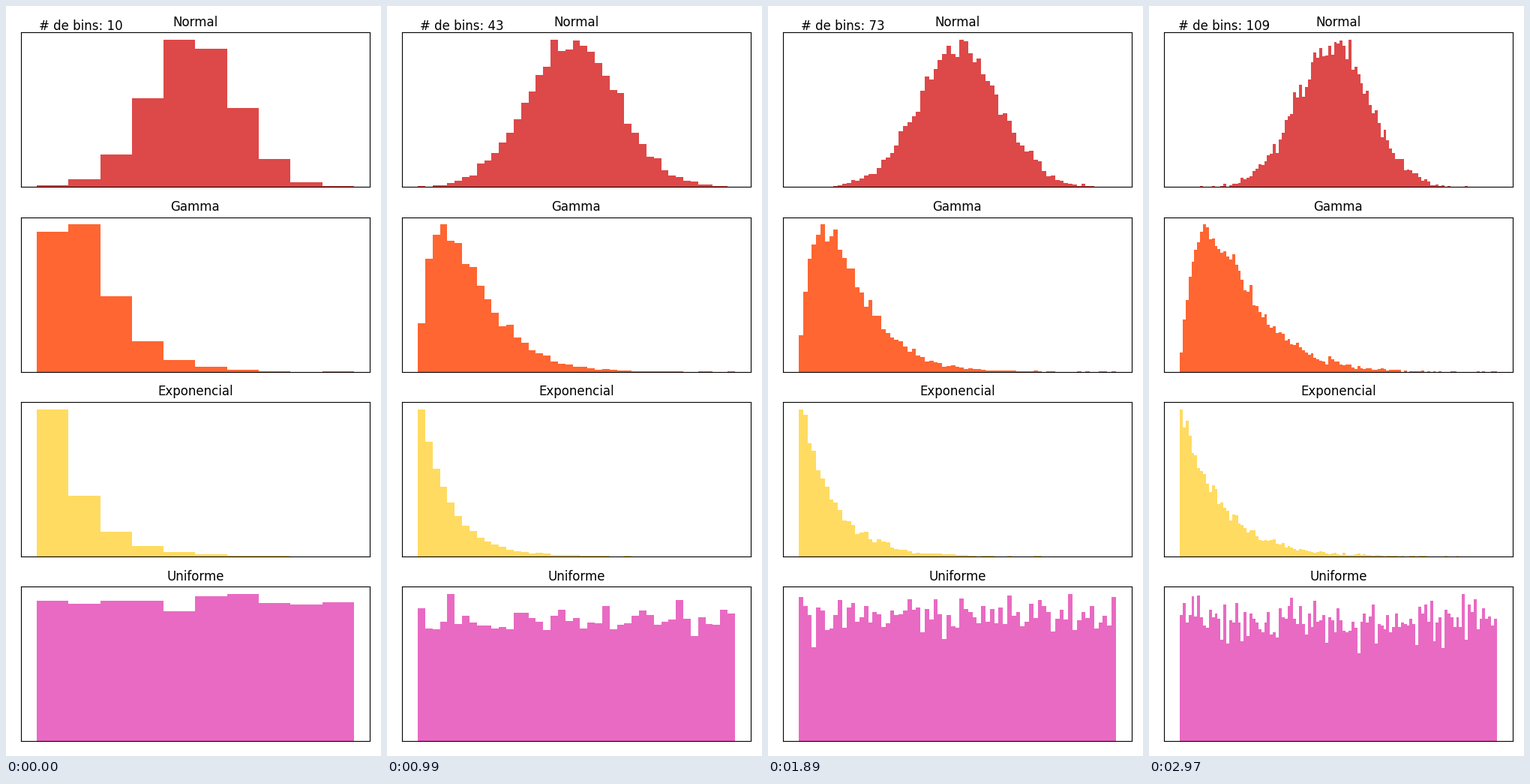
A matplotlib script for the animation above (3000 ms loop, 500 by 1000 pixels).

```python
import numpy as np
import matplotlib.pyplot as plt
from matplotlib.animation import FuncAnimation

W, H, DPI = 500, 1000, 100
FRAMES, INTERVAL = 100, 30
FIRST_BINS = 10
SAMPLES = 10000

PANELS = [
    ("Normal", "#dd4848", lambda rng: rng.normal(size=SAMPLES)),
    ("Gamma", "#ff6632", lambda rng: rng.gamma(2.0, size=SAMPLES)),
    ("Exponencial", "#ffdb61", lambda rng: rng.exponential(size=SAMPLES)),
    ("Uniforme", "#e96ac3", lambda rng: rng.uniform(size=SAMPLES)),
]

# Panel layout in pixels, measured from the top left
LEFT, RIGHT = 19.86, 485
TOP, PITCH, HEIGHT = 35.33, 246.25, 206.05
LABEL_X, LABEL_BASE = 100, 32

plt.rcParams["font.family"] = "DejaVu Sans"
fig = plt.figure(figsize=(W / DPI, H / DPI), dpi=DPI, facecolor="white")


def add_panel(row, name, color):
    bottom = H - (TOP + row * PITCH + HEIGHT)
    ax = fig.add_axes([LEFT / W, bottom / H, (RIGHT - LEFT) / W, HEIGHT / H])
    ax.set_title(name, fontsize=12, pad=6, y=1.0)
    bars = ax.stairs([1], [0, 1], fill=True, color=color, linewidth=0)
    ax.set(xlim=(-0.05, 1.05), ylim=(0, 1.05), xticks=[], yticks=[])
    return bars


shapes = [add_panel(row, name, color)
          for row, (name, color, _) in enumerate(PANELS)]
label = fig.text(LABEL_X / W, 1 - LABEL_BASE / H, "", fontsize=12,
                 ha="center", va="baseline")


def draw(i):
    """Draw fresh samples, binned over their own range and scaled to the peak."""
    bins = FIRST_BINS + i
    rng = np.random.default_rng(bins)
    edges = np.linspace(0, 1, bins + 1)
    for shape, (_, _, sample) in zip(shapes, PANELS):
        counts, _ = np.histogram(sample(rng), bins=bins)
        shape.set_data(counts / counts.max(), edges)
    label.set_text(f"# de bins: {bins}")
    return [*shapes, label]


anim = FuncAnimation(fig, draw, frames=FRAMES, init_func=lambda: draw(0),
                     interval=INTERVAL, repeat=True)
plt.show()
```
